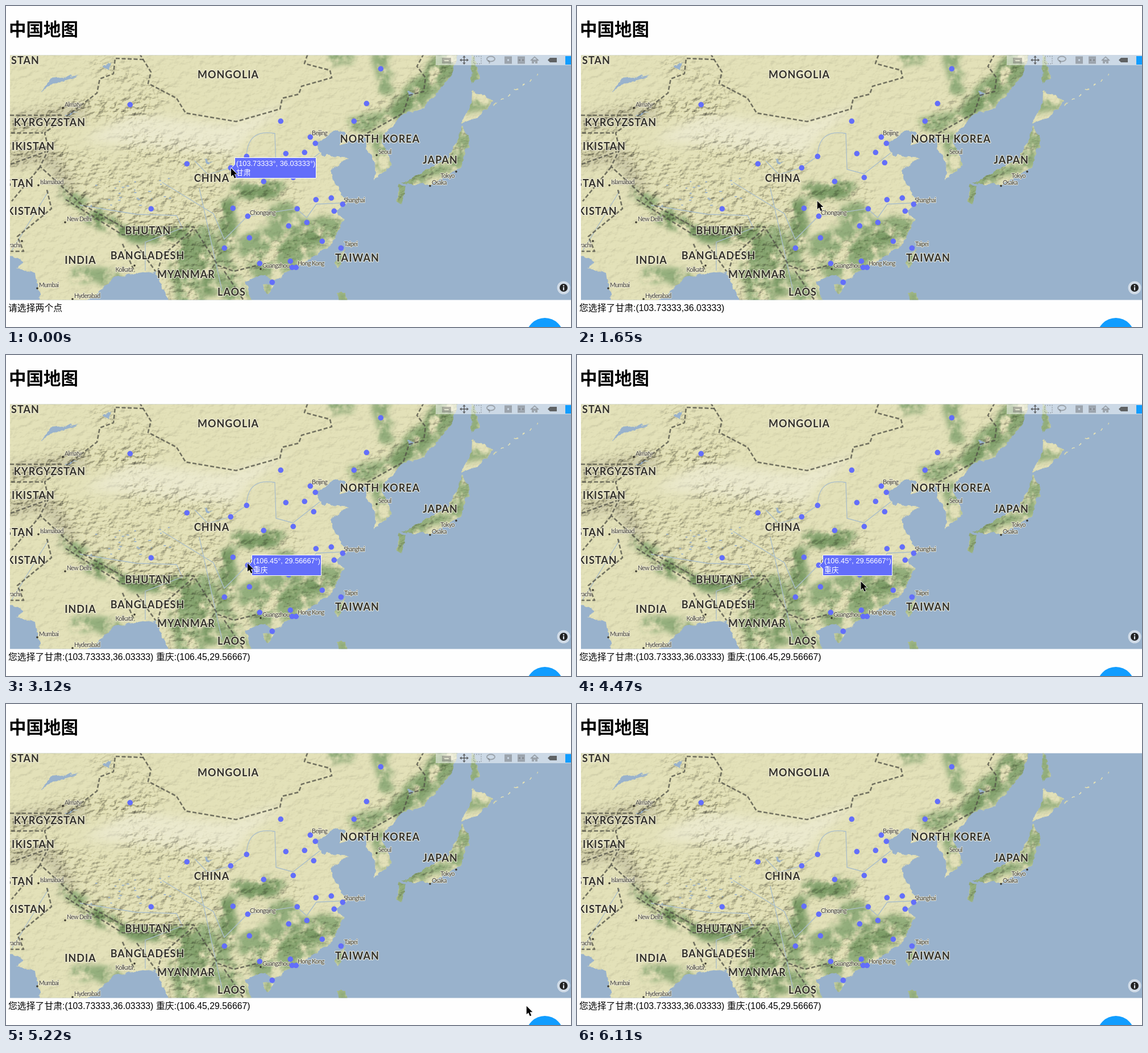
An HTML page for the animation above (8000 ms loop, 994x564 px).

```html
<!DOCTYPE html>
<html lang="zh-CN">
<head>
<meta charset="utf-8">
<title>中国地图</title>
<style>
html, body { margin: 0; width: 100%; height: 100%; overflow: hidden; background: #fefefe; }
body > svg { position: absolute; left: 0; top: 0; will-change: transform; }
text { font-family: "Liberation Sans", "Noto Sans CJK SC", "Noto Sans CJK", sans-serif; }
#labels text { font-family: Lato, "Open Sans", sans-serif; fill: #33312a; stroke: #f0eedccc; paint-order: stroke; stroke-linejoin: round; }
#labels .country { font-weight: 700; font-size: 18px; letter-spacing: 1px; stroke-width: 2.5px; }
#labels .city { font-size: 10.7px; letter-spacing: -.65px; fill: #45433b; stroke-width: 2px; }
#relief { mix-blend-mode: multiply; }
.sea { fill: #99b2cc; }
.lines { fill: none; stroke-linecap: round; stroke-linejoin: round; }
.rivers { fill: none; stroke: #a9bdca; stroke-width: 1.3; }
.borders { fill: none; stroke: #55564a; stroke-opacity: .8; stroke-width: 2.6; stroke-dasharray: 7 3.5; stroke-linejoin: round; }
.tip path { fill: #636efa; stroke: #fff; }
.tip text { font-size: 12.75px; fill: #fff; }
.status { font-size: 15.85px; }
</style>
</head>
<body>
<svg width="994" height="564">
  <defs>
    <filter id="rough" color-interpolation-filters="sRGB">
      <feTurbulence type="fractalNoise" baseFrequency=".08" numOctaves="3" seed="4"/>
      <feDisplacementMap in="SourceGraphic" scale="9" xChannelSelector="R" yChannelSelector="G"/>
    </filter>
    <filter id="soft">
      <feGaussianBlur stdDeviation="9"/>
    </filter>
    <filter id="patchy" color-interpolation-filters="sRGB">
      <feTurbulence type="fractalNoise" baseFrequency=".035" numOctaves="4" seed="9" result="noise"/>
      <feColorMatrix values="1 0 0 0 0  0 1 0 0 0  0 0 1 0 0  0 0 0 4 -1.2" result="patches"/>
      <feDisplacementMap in="SourceGraphic" in2="noise" scale="24" xChannelSelector="R" yChannelSelector="G"/>
      <feGaussianBlur stdDeviation="5"/>
      <feComposite in2="patches" operator="in"/>
    </filter>
    <filter id="hills" color-interpolation-filters="sRGB">
      <feTurbulence type="fractalNoise" baseFrequency=".07 .1" numOctaves="4" seed="3"/>
      <feDiffuseLighting surfaceScale="3" diffuseConstant="1.25" lighting-color="#fffef4">
        <feDistantLight azimuth="225" elevation="53"/>
      </feDiffuseLighting>
    </filter>
    <mask id="land" maskUnits="userSpaceOnUse" x="0" y="80" width="994" height="445">
      <g fill="#fff" stroke-linejoin="round" filter="url(#rough)">
        <path d="M0 70H802L783 124 735 179 699 190 660 234 680 280 648 304 650 276 633 250 632 231 586 244 598 223 583 217 545 242 554 262 602 267 569 290 599 348 581 358 595 375 570 421 521 455 467 484 456 470 420 485 440 530H290L262 466 192 476 138 525H62L52 471 18 460 30 448 0 434Z"/>
        <path d="M452 490L472 489 459 505ZM597 423L585 461 579 450ZM583 503H598L600 525H585Z"/>
        <path d="M819 148L858 168 828 197 800 206 818 175ZM803 211L817 236 799 284 748 314 697 312 746 283 779 268ZM711 322L735 311M691 315L703 318 696 349 688 344ZM820 78L833 128 819 136Z"/>
        <path d="M859 174L935 121" stroke="#fff" stroke-width="2" stroke-dasharray="5 10"/>
      </g>
    </mask>
    <mask id="mountains" maskUnits="userSpaceOnUse" x="0" y="80" width="994" height="445">
      <path fill="#222" d="M0 80H994V525H0Z"/>
      <g class="lines" filter="url(#soft)" stroke="#fff">
        <path stroke-width="36" d="M10 215L125 180 245 180M15 265L90 255 130 345 250 390 330 390"/>
        <path stroke="#aaa" stroke-width="60" d="M140 285L300 345M230 250L375 275M350 330L370 430M310 430V520"/>
        <path stroke="#888" stroke-width="40" d="M170 105L270 155M410 330H500M390 470L570 390M785 95L620 215M805 220L695 340"/>
      </g>
    </mask>
  </defs>

  <svg x="7" y="86.500" width="987" height="430" viewBox="7 86.500 987 430">
    <path class="sea" d="M0 80H994V525H0Z"/>
    <g mask="url(#land)">
      <path fill="#e3e1b9" d="M0 80H994V525H0Z"/>
      <path fill="#ebe9ce" filter="url(#soft)" d="M135 235L225 190 390 208 500 170 425 230 400 262 250 248Z"/>
      <path class="lines" filter="url(#soft)" stroke="#cbc8a8" stroke-width="26" d="M15 205L130 185M15 270L75 260 110 320"/>
      <g class="lines" filter="url(#patchy)" stroke="#93ae7c">
        <path stroke-width="24" d="M100 330L225 404H330M615 208L665 195M655 235L670 290M589 425V460M462 492V500M590 510V520"/>
        <path stroke-width="48" d="M345 405L310 440 330 520M370 440L410 520M785 95L700 178"/>
        <path stroke-width="54" d="M435 420L570 395M450 455L520 435M490 370V400"/>
        <path stroke-width="30" d="M410 326L480 320M390 350V410M575 92H600M660 95L668 145M805 220L800 270 700 305 695 340M820 172H840M822 85V130M130 470L195 480"/>
      </g>
      <g class="lines" filter="url(#patchy)" stroke="#7b9b66" stroke-width="22">
        <path d="M150 372L225 402 320 408 300 475M340 430L360 500M408 332L470 322M775 100L690 185M480 425L550 400M390 350V420"/>
      </g>
      <path id="relief" d="M0 80H994V525H0Z" filter="url(#hills)" mask="url(#mountains)"/>
    </g>
    <path class="sea" filter="url(#rough)" d="M62 151L79 127 129 122 80 138ZM171 104L184 100 180 113ZM104 190L127 186 109 194ZM349 269L363 274 354 276ZM706 150L717 151 708 160Z"/>
    <g id="ponds" class="sea"></g>
    <g class="rivers">
      <path d="M332 272L355 296 395 284 423 264Q425 215 473 224L475 287 505 295 552 258"/>
      <path d="M275 310L365 365 384 410 425 369 511 356 529 372 546 348 595 346M130 350L230 366 300 368 310 390 245 415V465M75 325L10 430M340 320L380 500"/>
    </g>
    <g class="borders">
      <path d="M235 84L255 116 250 136 300 162 316 188 405 203 482 181 486 162 515 155 520 141 573 126 570 113 525 101 531 84"/>
      <path d="M242 94L192 92 189 119 165 128 160 153 68 223 75 252 60 282 131 347 205 388H330L373 456 401 466 445 455"/>
      <path d="M735 84L723 106 738 126 735 150 709 157 699 188 626 229M105 340L205 402H289M72 323L80 356 20 405 31 431H8"/>
      <path d="M205 418L226 467M230 420L263 466M329 392L274 440 266 470M367 454L350 480M384 466L420 520M7 192H98M9 223H65M8 278L70 256M60 283L10 343"/>
    </g>
    <g id="labels"></g>
    <g id="dots" fill="#636efa"></g>
    <circle cx="981" cy="495" r="11.500" fill="#fff" fill-opacity=".55"/>
    <circle cx="981" cy="495" r="7" fill="#222"/>
    <path stroke="#dde4eb" stroke-width="2.200" d="M981 490.500v2.200M981 494v5.500"/>
  </svg>
  <text x="5" y="52" font-size="30.500" font-weight="700">中国地图</text>
</svg>

<svg width="994" height="564">
  <g id="modebar">
    <path fill="#fff" fill-opacity=".5" d="M756 87H994V104H756Z"/>
    <g fill="none" stroke="#444" stroke-opacity=".35" stroke-width="2">
      <path stroke-width="4" d="M769 93h12v6h-12z"/>
      <path stroke-width="1.500" stroke-dasharray="2 2" d="M823 88.500h13v13h-13z"/>
      <ellipse cx="853" cy="93" rx="7" ry="4.500"/><path d="M848 96q4 2 2 5"/>
      <path stroke-width="5" d="M879.500 91h8v8h-8zM902.500 91h8v8h-8z"/>
      <path d="M902 95h9M923 96l7-6.500 7 6.500"/><path stroke-width="4" d="M927 101v-5h6v5"/>
    </g>
    <g id="pan" fill="#444" fill-opacity=".8"></g>
    <path fill="#444" fill-opacity=".8" d="M953 95l4-4h12v8h-12z"/>
    <path fill="#119dff" d="M984 88H994V103H984Z"/>
  </g>
  <g class="tip" id="gansu">
    <path d="M396.500 284.500l6-6v-12h143v36h-143v-12z"/>
    <text x="405" y="281">(103.73333°, 36.03333°)</text><text x="405" y="297">甘肃</text>
  </g>
  <g class="tip" id="chongqing">
    <path d="M426.500 369.500l6-6v-12h122v36h-122v-12z"/>
    <text x="435" y="366">(106.45°, 29.56667°)</text><text x="435" y="382">重庆</text>
  </g>
  <text class="status" id="first" x="4" y="536"></text>
  <text class="status" id="second" x="264" y="536">重庆:(106.45,29.56667)</text>
  <circle cx="948" cy="581" r="33" fill="#119dff"/>
  <path id="cursor" d="M0 0V14.500L3.300 11.400 6 17.500 8.500 16.400 5.900 10.400H10.500Z" stroke="#fff" stroke-width="1.200" paint-order="stroke"/>
</svg>

<script>
const $ = id => document.getElementById(id);

function add(parent, tag, attributes, text = '') {
  const node = document.createElementNS('http://www.w3.org/2000/svg', tag);
  for (const key in attributes) node.setAttribute(key, attributes[key]);
  node.textContent = text;
  $(parent).append(node);
}

// Filters cover the whole map, so their noise stays in place.
for (const filter of document.querySelectorAll('filter')) {
  const region = {filterUnits: 'userSpaceOnUse', x: 0, y: 80, width: 994, height: 445};
  for (const key in region) filter.setAttribute(key, region[key]);
}

const label = (kind, name, x, y, anchor) =>
  add('labels', 'text', {class: kind, x, y, 'text-anchor': anchor}, name);

function country(name, x, y) {
  label('country', name, x, y, 'middle');
}

function city(name, x, y, anchor = 'start') {
  label('city', name, x, y, anchor);
  const atEnd = anchor === 'end';
  add('labels', 'circle', {cx: x + (atEnd ? 3 : -3), cy: y + (atEnd ? -11 : 2), r: 1.8, fill: '#37352c'});
}

country('MONGOLIA', 391, 127);
country('NORTH KOREA', 658, 240);
country('KYRGYZSTAN', 77, 211);
country('CHINA', 362, 309);
country('JAPAN', 764, 277);
country('BHUTAN', 250, 401);
country('INDIA', 131, 453);
country('BANGLADESH', 249, 445);
country('MYANMAR', 317, 478);
country('LAOS', 397, 509);
country('TAIWAN', 618, 449);
country('STAN', 34, 102);
country('IKISTAN', 48, 253);
country('STAN', 24, 318);
country('KISTAN', 36, 367);

city('Almaty', 103, 177);
city('Islamabad', 60, 313);
city('New Delhi', 107, 378);
city('Mumbai', 58, 494);
city('Hyderabad', 120, 513);
city('Chongqing', 429, 367);
city('Beijing', 538, 227);
city('Seoul', 655, 260);
city('Osaka', 749, 314);
city('Shanghai', 594, 345);
city('Taipei', 595, 422);
city('Guangzhou', 451, 460);
city('Hong Kong', 513, 456);
city('Tokyo', 789, 302, 'end');
city('Kolkata', 223, 467, 'end');
city('Karachi', 25, 424, 'end');

const capitals = `218,173 659,110 634,171 612,202 483,202 535,230 544,241 525,257 492,259 423,264 395,284 318,277
  541,275 505,301 453,308 545,340 572,337 592,348 577,360 399,355 425,369 512,356 529,380 497,386 428,407
  556,413 589,425 384,425 446,452 500,448 503,459 510,459 468,485 255,356`;
for (const place of capitals.split(/\s+/)) {
  const [x, y] = place.split(',').map(Number);
  add('dots', 'circle', {cx: x + .3, cy: y + .3, r: 4.8});
}

let seed = 7;
const random = () => (seed = seed * 16807 % 2147483647) / 2147483647;
for (let i = 0; i < 24; i++) {
  add('ponds', 'ellipse', {cx: 150 + random() * 150, cy: 300 + random() * 55, rx: 1 + random() * 2, ry: 1});
}

for (let angle = 0; angle < 360; angle += 90) {
  add('pan', 'path', {d: 'M805.300 95v-4.500h-2l2.700-3.500 2.700 3.500h-2v4.500z', transform: `rotate(${angle} 806 95)`});
}

const show = (id, visible) => $(id).style.display = visible ? '' : 'none';
const easeOut = (from, to, u, power) => to - (to - from) * (1 - Math.min(1, Math.max(0, u))) ** power;

function pointerAt(t) {
  if (t < 1350) return [396, 285];
  if (t < 1500) return [402, 293];
  const sampled = Math.floor((t + 6) / 149) * 149;
  if (t < 4470) {
    const u = (sampled - 1490) / 596;
    return [easeOut(422, 425, u, 1), easeOut(329, 366, u, 1.6)];
  }
  if (t < 4620) return [499.5, 398];
  const u = (sampled - 4768) / 894;
  return [easeOut(675, 953, u, 2.9), easeOut(472, 563, u, 1.5)];
}

function draw() {
  const t = performance.now() % 8000;
  $('cursor').setAttribute('transform', `translate(${pointerAt(t)})`);
  show('cursor', t < 5960);
  show('gansu', t < 1500);
  show('chongqing', t >= 1940 && t < 4620);
  show('second', t >= 3120);
  const status = t < 450 ? '请选择两个点' : '您选择了甘肃:(103.73333,36.03333)';
  if ($('first').textContent !== status) $('first').textContent = status;
  $('modebar').style.opacity = t < 5370 ? 1 : t < 5520 ? .4 : 0;
  requestAnimationFrame(draw);
}
draw();
</script>
</body>
</html>
```
